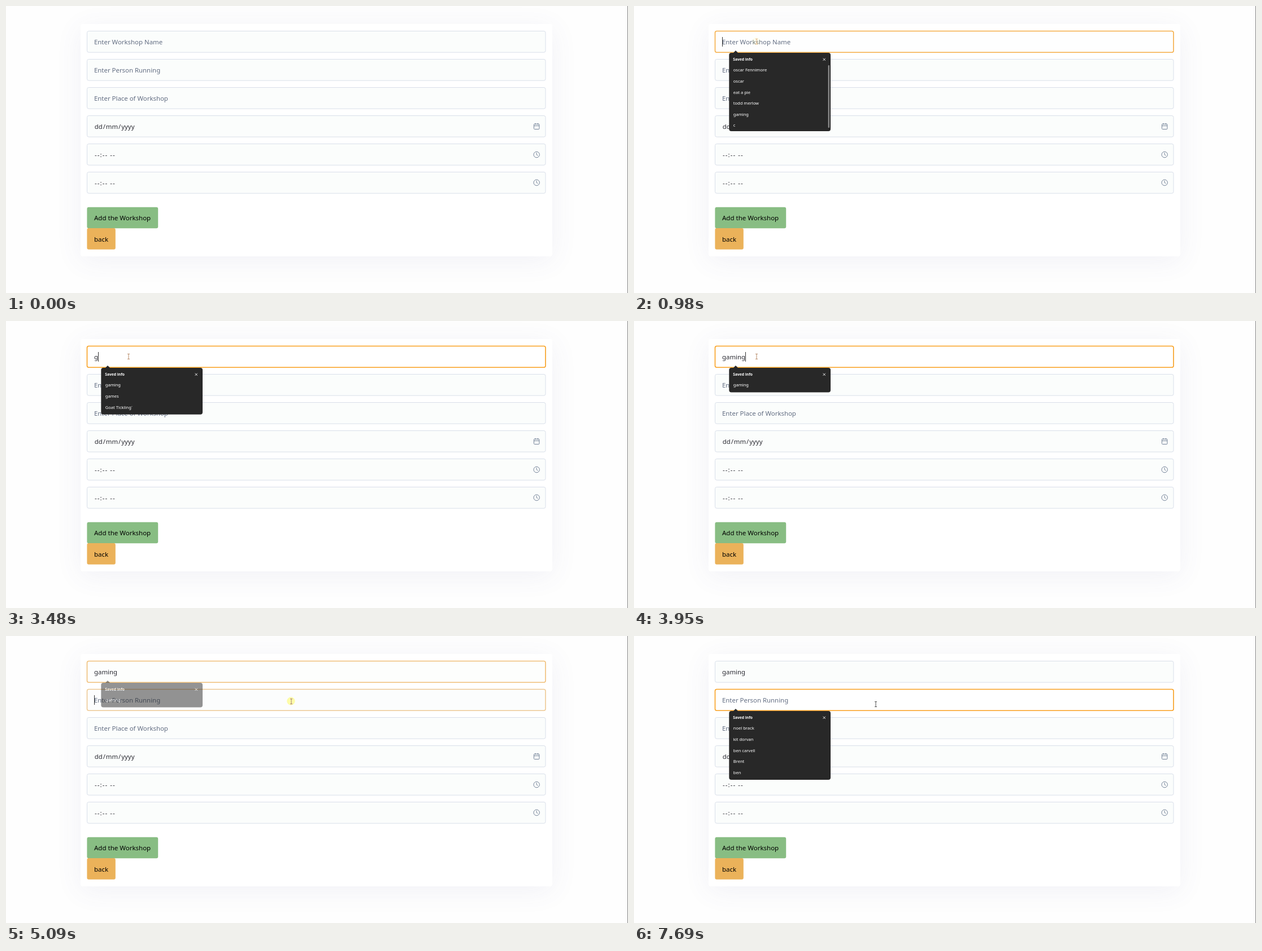
An HTML page that plays this animation: 1101 by 509 pixels, repeating every 8 s.

```html
<!DOCTYPE html>
<html lang="en">
<head>
<meta charset="utf-8">
<title>Workshop form</title>
<style>
  html, body { margin: 0; width: 1101px; height: 509px; overflow: hidden; background: #fefefe; }
  body { position: relative; }
  .card { position: absolute; left: 132px; top: 32px; width: 835px; height: 412px; border-radius: 4px;
          background: #fff; box-shadow: 0 8px 48px rgba(75, 85, 150, .075); }
  svg { position: absolute; left: 0; top: 0; display: block; }
  text { font: 11.4px "Noto Sans", "Open Sans", sans-serif; fill: #2b2b33; white-space: pre; }
  .hint { fill: #626d82; }
  .btn { font-size: 11.5px; fill: #000; }
  .head { font-size: 6.7px; font-weight: 600; fill: #fff; }
  .item { font-size: 7.55px; font-weight: 500; fill: #fff; }
  .field { fill: #fbfdfc; stroke: #d9dfea; }
  .ring { fill: #fff; stroke: #f9a01f; stroke-width: 1.6; }
  .icon { fill: none; stroke: #718096; stroke-width: 1; }
</style>
</head>
<body>
<div class="card"></div>
<svg id="stage" width="1101" height="509" viewBox="0 0 1101 509"></svg>
<script>
const LOOP = 8000;
const stage = document.getElementById('stage');
const fieldY = i => 44.5 + i * 50;

function add(tag, attrs, parent = stage, text) {
  const el = document.createElementNS('http://www.w3.org/2000/svg', tag);
  for (const k in attrs) el.setAttribute(k, attrs[k]);
  if (text) el.textContent = text;
  parent.append(el);
  return el;
}
const label = (x, y, text, cls = '', parent = stage) => add('text', { x, y, class: cls }, parent, text);
const show = (el, on) => { el.style.opacity = +on; };

// Static form
const hints = ['Enter Workshop Name', 'Enter Person Running', 'Enter Place of Workshop'];
const rings = [], texts = [];
for (let i = 0; i < 6; i++) {
  const box = { x: 143.5, y: fieldY(i), width: 811.5, height: 37.7, rx: 3 };
  add('rect', { ...box, class: 'field' });
  if (i < 2) rings.push(add('rect', { ...box, class: 'ring' }));
  if (i < 3) texts.push(label(156, fieldY(i) + 23.7, hints[i], 'hint'));
}

// Date and time parts have a little side padding, as in native inputs
const date = label(156.8, 218.2, '');
['dd', '/', 'mm', '/', 'yyyy'].forEach((s, i) => add('tspan', { dx: i ? .9 : 0 }, date, s));
for (const y of [268, 317.6]) {
  label(157, y, '--:-- --').setAttribute('letter-spacing', '1.1');
  add('circle', { cx: 939.2, cy: y - 4.4, r: 5.2, class: 'icon' });
  add('path', { d: `M939.2 ${y - 7.8}v3.6l2.4 1.3`, class: 'icon' });
}
add('rect', { x: 934.5, y: 209.3, width: 9.4, height: 9.2, rx: 1, class: 'icon' });
add('path', { d: 'M934.5 212.4h9.4M937 207.8v2.6M941.4 207.8v2.6', class: 'icon' });

add('rect', { x: 143.4, y: 356.7, width: 125.8, height: 37.5, rx: 3, fill: '#88bd83' });
label(156, 380.4, 'Add the Workshop', 'btn');
add('rect', { x: 143.4, y: 394, width: 50.4, height: 37.7, rx: 3, fill: '#ebb25a' });
label(156, 417.8, 'back', 'btn');
add('rect', { x: 1100, y: 0, width: 1, height: 509, fill: '#858585' });

const caret = add('rect', { width: 1, height: 17, fill: '#333' });

// Suggestion popups: [from, to, field, items, fade start]
const popups = [
  [910, 3480, 0, ['oscar Fennimore', 'oscar', 'eat a pie', 'todd merlow', 'gaming', 'c']],
  [3480, 3550, 0, ['gaming', 'games', 'Goat Tickling`']],
  [3550, 3880, 0, ['gaming', 'games']],
  [3880, 5150, 0, ['gaming'], 5020],
  [5150, LOOP, 1, ['noel brack', 'kit dorvan', 'ben carvell', 'Brent', 'ben']]
].map(([from, to, field, items, fade]) => {
  const g = add('g', { transform: `translate(168 ${83 + field * 50})` });
  const n = items.length;
  const height = n > 5 ? 139 : 24 + n * 19.6;
  add('rect', { x: .3, width: 179.7, height, rx: 4, fill: '#282828' }, g);
  add('path', { d: 'M7.5.5L12-4l4.5 4.5z', fill: '#282828' }, g);
  label(7.3, 14.4, 'Saved info', 'head', g);
  add('path', { d: 'M166.6 9.7l4.2 4.2m0-4.2l-4.2 4.2', stroke: '#fff', 'stroke-width': .9 }, g);
  items.forEach((s, i) => label(7.8, 33.4 + i * 19.6, s, 'item', g));
  if (n > 5) add('rect', { x: 175.6, y: 22, width: 2.4, height: 111, rx: 1, fill: '#8b8b8b' }, g);
  return { g, from, to, fade };
});

// Pointer
const pointer = add('g', {});
const halo = add('circle', { cx: -.6, cy: -.5, r: 7.2, fill: '#fdfb62' }, pointer);
const beam = add('path', { d: 'M-2-4.5h4M0-4.5v9M-2 4.5h4', fill: 'none', 'stroke-width': 1 }, pointer);
const arrow = add('path', {
  d: 'M0 0v11l2.6-2.4 1.7 3.8 1.7-.8-1.7-3.6h3.5z', fill: '#fff', stroke: '#222', 'stroke-width': .8
}, pointer);

// [first step, last step, number of steps, from, to]
const moves = [
  [130, 770, 10, [318, 500], [217, 63]],
  [4480, 4950, 8, [217, 63], [505, 116]],
  [5290, 5560, 5, [505, 116], [428, 121]]
];
const clicks = [840, 5020];
const typing = [[3480, 'g'], [3550, 'ga'], [3610, 'gam'], [3680, 'gam'], [3880, 'gamin'], [3950, 'gaming']];
const blinks = [840, 1370, 1930, 2410, 2940, 4480, 5020, 5550, 6090, 6630, 7160, 7690];

const clamp = v => Math.max(0, Math.min(1, v));
const ease = p => p * p * (3 - 2 * p);
const since = (t, start) => Math.floor((t - start) / 68) * 68;
const focus = (t, i) => clamp((since(t, clicks[i]) + 10) / 180) * (t >= clicks[i]);

function pointerAt(t) {
  const [a, b, n, p, q] = moves.filter(m => t >= m[0]).pop();
  const k = Math.min(n - 1, Math.floor((t - a) / (b - a) * (n - 1) + 1e-6));
  const e = ease((k + 1) / n);
  return p.map((v, i) => v + (q[i] - v) * e);
}

function drawPointer(t) {
  show(pointer, t >= 130);
  if (t < 130) return;
  const [x, y] = pointerAt(t);
  const inField = x > 143 && x < 956 && y > 44 && y < 333 && (y - 44) % 50 < 39;
  pointer.setAttribute('transform', `translate(${x} ${y})`);
  show(beam, inField);
  show(arrow, !inField);
  const glow = clicks.map(c => t < c ? 0 : clamp(1 - since(t, c) / 150));
  show(halo, Math.max(...glow));
  const pale = t >= 910 && t < 3480 ? '#dfb184' : t >= 3480 && t < 4480 ? '#b98d6c' : '#555';
  beam.setAttribute('stroke', t >= 5090 && t < 5290 ? '#a87f7a' : pale);
}

function draw(t) {
  const lit = focus(t, 1);
  show(rings[0], focus(t, 0) * (1 - lit));
  show(rings[1], lit);

  const typed = typing.filter(s => t >= s[0]).pop();
  const value = typed ? typed[1] : hints[0];
  if (texts[0].textContent !== value) texts[0].textContent = value;
  texts[0].setAttribute('class', typed ? '' : 'hint');

  const second = t >= clicks[1];
  const end = typed && !second ? texts[0].getComputedTextLength() : 0;
  caret.setAttribute('x', 156 + Math.round(end));
  caret.setAttribute('y', second ? 105 : 55);
  show(caret, blinks.filter(b => t >= b).length % 2);

  for (const p of popups) {
    const on = t >= p.from && t < p.to;
    const fade = p.fade && t >= p.fade ? .95 - since(t, p.fade) / 150 : 1;
    show(p.g, on ? clamp(fade) : 0);
  }
  drawPointer(t);
}

const start = performance.now();
function tick() {
  draw((performance.now() - start) % LOOP);
  requestAnimationFrame(tick);
}
tick();
</script>
</body>
</html>
```
